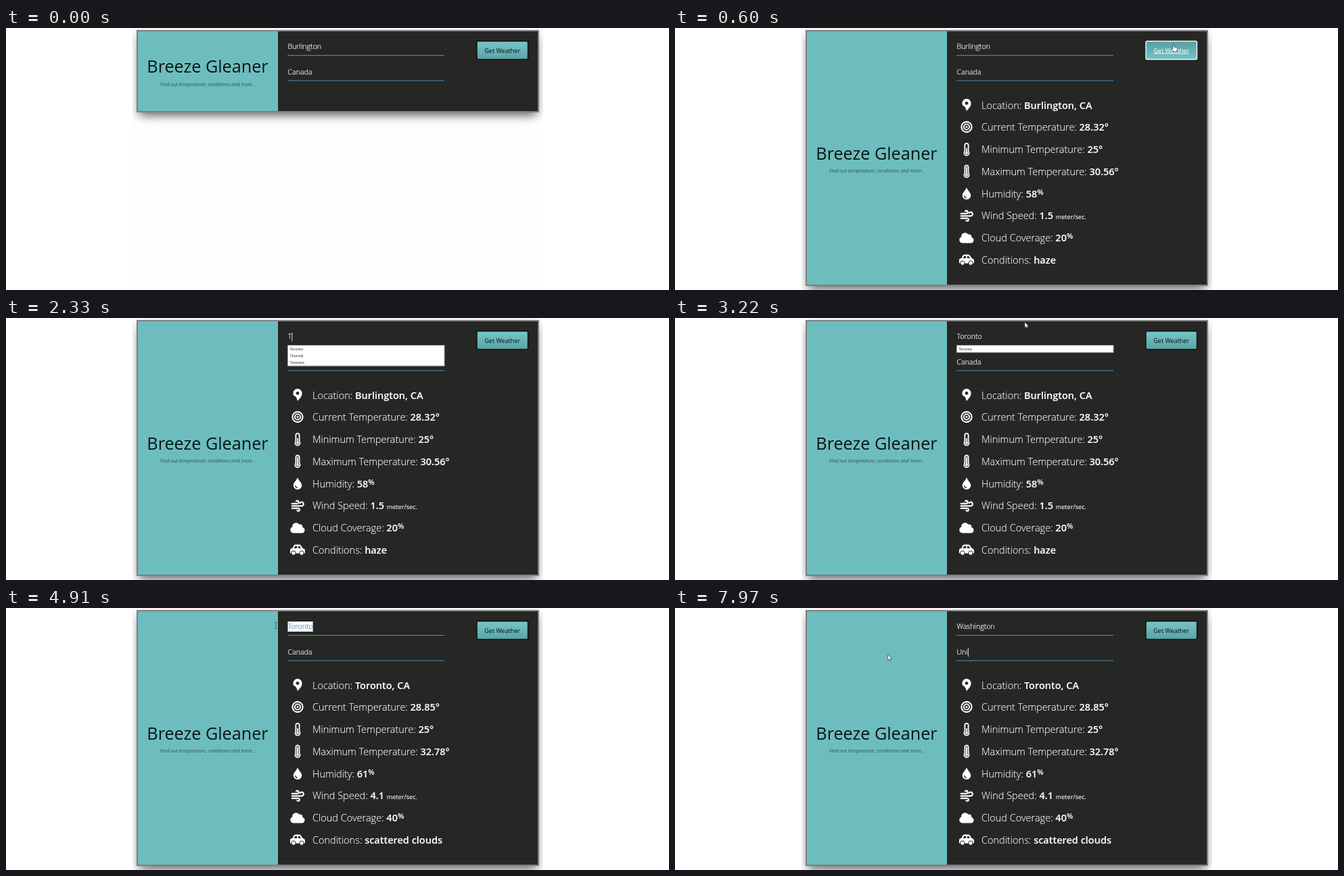
Write an HTML page that moves like this. It is 980 by 388 pixels and loops after 8 s.

```html
<!DOCTYPE html>
<html lang="en">
<head>
<meta charset="utf-8">
<title>Breeze Gleaner</title>
<style>
  html, body { margin: 0; width: 100%; height: 100%; overflow: hidden; background: #fff; }
  #page { position: absolute; left: 187px; top: 0; width: 607px; height: 388px; overflow: hidden; background: #fefefe; }
  #card {
    position: absolute; left: 6px; top: 3px; width: 595px; height: 122px; box-sizing: border-box;
    border: 2px solid #7d807f;
    background: linear-gradient(90deg, #6dbdbf 207px, #262624 207px);
    box-shadow: 0 10px 14px -6px rgba(0, 0, 0, .5), 0 4px 12px rgba(0, 0, 0, .2);
  }
  #card.open { height: 379px; }
  svg { position: absolute; left: 0; top: 0; width: 980px; height: 388px; }
  text { font-family: "Open Sans", sans-serif; white-space: pre; }
  .title { font-size: 25.2px; text-anchor: middle; fill: #0c1414; }
  .tagline { font-size: 7.5px; font-weight: 300; font-style: italic; text-anchor: middle; fill: #0c1a1a; }
  .field { font-size: 10.6px; font-weight: 300; fill: #fff; stroke: #fff; stroke-width: .2; }
  .picked { fill: #3f86b5; stroke: #3f86b5; }
  .row { font-size: 14.5px; font-weight: 300; fill: #fff; stroke: #fff; stroke-width: .12; }
  .value { font-weight: 600; }
  .sup { font-size: 10.8px; font-weight: 600; }
  .unit { font-size: 9.1px; font-weight: 400; }
  .option { font-size: 5.4px; fill: #111; }
  #button rect { fill: url(#idle); stroke: #0b1111; stroke-width: 1.4; }
  #button text { font-size: 9px; text-anchor: middle; fill: #071010; }
  #button.hover rect { fill: url(#hover); stroke: #f2fafa; }
  #button.hover text { fill: #fff; text-decoration: underline; }
  .line { fill: none; stroke: #fff; stroke-linecap: round; }
</style>
</head>
<body>
<div id="page"><div id="card"></div></div>
<svg viewBox="0 0 980 388">
  <defs>
    <linearGradient id="idle" x2="0" y2="1"><stop stop-color="#78c6c8"/><stop offset="1" stop-color="#58a3a5"/></linearGradient>
    <linearGradient id="hover" x2="0" y2="1"><stop stop-color="#559fa1"/><stop offset="1" stop-color="#74c3c5"/></linearGradient>
    <g id="thermometer">
      <path d="M-2.6 3V-6a2.6 2.6 0 0 1 5.2 0V3a3.6 3.6 0 1 1-5.2 0Z" class="line" stroke-width="1.8"/>
      <circle cy="5.4" r="2" fill="#fff"/>
    </g>
  </defs>

  <g id="heading">
    <text class="title" x="298" y="66">Breeze Gleaner</text>
    <text class="tagline" x="298.5" y="85.5">Find out temperature, conditions and more...</text>
  </g>

  <path d="M416 40.5H648M416 78H648" stroke="#4d8fc4"/>
  <g id="fields"></g>
  <g id="list"></g>

  <g id="button">
    <rect x="696" y="19.5" width="75.5" height="27" rx="2"/>
    <text x="733.7" y="36.5">Get Weather</text>
  </g>

  <g id="report">
    <g id="rows"></g>
    <g fill="#fff">
      <path transform="translate(431 114)" fill-rule="evenodd" d="M0 9C-2-1-6.6 3-6.6-2.6a6.6 6.6 0 0 1 13.2 0C6.6 3 2 6 0 9ZM0-5a2.4 2.4 0 1 0 .01 0Z"/>
      <g transform="translate(431 146.5)">
        <circle r="7.6" class="line" stroke-width="2.1"/><circle r="4.1" class="line" stroke-width="1.9"/><circle r="1.6"/>
      </g>
      <g transform="translate(431 179.5)"><use href="#thermometer"/><path d="M0-1V5" class="line" stroke-width="1.6"/></g>
      <g transform="translate(431 212)"><use href="#thermometer"/><path d="M0-5.5V5" class="line" stroke-width="1.8"/></g>
      <path transform="translate(431 245)" fill-rule="evenodd" d="M0-9C1.5-4 6.3-1.5 6.3 3a6.3 6.1 0 0 1-12.6 0C-6.3-1.5-1.5-4 0-9ZM-3.9 3a3.9 3.9 0 0 0 3.9 3.9v-1.3a2.7 2.7 0 0 1-2.7-2.6Z"/>
      <path transform="translate(431 278.3)" class="line" stroke-width="2.2" d="M-8.3-3.5H-.5a2.1 2.1 0 1 0-1.5-3.4M-8.3 0H6a2.8 2.8 0 1 0-2.3-4.3M-8.3 3.5H1a2 2 0 1 1-1.6 3.3"/>
      <path transform="translate(431 311)" d="M-6.5 7.5a4.7 4.7 0 0 1-1.3-9A5.8 5.8 0 0 1 2.7-5.3 3.5 3.5 0 0 1 7.3-1.1 4.4 4.4 0 0 1 6.7 7.5Z"/>
      <g transform="translate(431 343.5)">
        <path fill-rule="evenodd" d="M-7.6-2.5-5.8-6.4Q-5-8-3.3-8H2.5Q4-8 5-6.6L7.7-2.5Q11-2 11 1V4Q11 5 10 5H-10Q-11 5-11 4V0Q-11-2.5-7.6-2.5ZM-5.2-2.5H-.8V-5.7H-3.8ZM.9-2.5H5L3-5.7H.9Z"/>
        <g stroke="#262624"><circle cx="-6" cy="4.6" r="3.2"/><circle cx="6" cy="4.6" r="3.2"/></g>
      </g>
    </g>
  </g>

  <g id="cursor">
    <path id="arrow" d="M0 0V8.4L1.9 6.7 3.2 9.5 4.5 8.9 3.2 6.2H5.9Z" fill="#fff" stroke="#222" stroke-width=".6"/>
    <path id="beam" d="M-2-4.6H-.6L0-4 .6-4.6H2M0-4V4M-2 4.6H-.6L0 4 .6 4.6H2" fill="none" stroke="#4d5556" stroke-width=".9"/>
    <path id="hand" d="M-1 .6Q0-.6 1 .6V4L4.8 5Q5.7 5.3 5.5 6.5L4.6 11H-.4L-3.4 7Q-3.6 5.5-2.2 5.9L-1 7Z" fill="#fff" stroke="#222" stroke-width=".7"/>
  </g>
</svg>
<script>
const LOOP = 8000, TEXT_X = 416.5;
const $ = id => document.getElementById(id);
const show = (node, on) => node.style.display = on ? '' : 'none';

// Pointer moves: start, end, number of steps, way points, progress at which dragging begins
const moves = [
  [70, 450, 6, [[731, 262], [718, 160], [726, 70], [737, 24]]],
  [830, 1600, 11, [[728, 30], [655, 38], [560, 36], [468, 28], [400, 25], [334, 21]], .6],
  [2920, 2920, 1, [[333, 28]]],
  [3220, 3800, 8, [[517, 6], [570, 40], [640, 58], [701, 34]]],
  [4230, 4970, 11, [[690, 42], [620, 50], [530, 42], [457, 30], [415, 27], [383, 25]], .6],
  [5050, 5050, 1, [[381, 24.5]], 0],
  [6060, 6060, 1, [[378, 10.5]]],
  [6550, 7150, 9, [[400, 22], [440, 48], [456, 66], [390, 68], [317, 69]], .5],
  [7810, 7810, 1, [[314.7, 69]]]
];
const hidden = [[0, 70], [2080, 2920], [5400, 6060], [7550, 7810]];

// Typing: word, time of each key, end of the caret
const cityTyping = [
  ['Toronto', [2080, 2400, 2550, 2640, 2735, 2830, 2920], 3080],
  ['Washington', [5400, 5494, 5588, 5682, 5776, 5870, 5964, 6210, 6285, 6360], 6550]
];
const countryTyping = [['United', [7550, 7720, 7970], LOOP]];

const reports = [
  ['Burlington, CA', '28.32°', '25°', '30.56°', '58', '1.5', '20', 'haze'],
  ['Toronto, CA', '28.85°', '25°', '32.78°', '61', '4.1', '40', 'scattered clouds']
];
const labels = ['Location', 'Current Temperature', 'Minimum Temperature', 'Maximum Temperature',
  'Humidity', 'Wind Speed', 'Cloud Coverage', 'Conditions'];
const percent = '<tspan class="sup" dy="-4">%</tspan>';
const suffix = { 4: percent, 5: ' <tspan class="unit">meter/sec.</tspan>', 6: percent };

const rowsHtml = values => labels.map((label, i) =>
  `<text class="row" x="453" y="${119.6 + i * 32.75}">${label}: <tspan class="value">${values[i]}</tspan>${suffix[i] || ''}</text>`
).join('');

function makeField(id, baseline) {
  $('fields').insertAdjacentHTML('beforeend', `
    <clipPath id="${id}Clip"><rect y="${baseline - 11}" height="15"/></clipPath>
    <text class="field" x="${TEXT_X}" y="${baseline}"></text>
    <g clip-path="url(#${id}Clip)">
      <rect x="416" y="${baseline - 11}" width="232" height="15" fill="#fff"/>
      <text class="field picked" x="${TEXT_X}" y="${baseline}"></text>
    </g>
    <rect y="${baseline - 9.5}" width=".9" height="13" fill="#f3e9e4"/>`);
  const clip = $(id + 'Clip').firstChild;
  const plain = $(id + 'Clip').nextElementSibling;
  const picked = plain.nextElementSibling.lastElementChild;
  const caret = $('fields').lastElementChild;
  return (word, from, caretOn) => {
    plain.textContent = picked.textContent = word;
    const end = TEXT_X + plain.getComputedTextLength();
    const left = Math.max(TEXT_X, from);
    clip.setAttribute('x', left);
    clip.setAttribute('width', Math.max(0, end - left));
    caret.setAttribute('x', end + .3);
    show(caret, caretOn);
  };
}
const drawCity = makeField('city', 31);
const drawCountry = makeField('country', 68.5);

function pointerAt(t) {
  const move = moves.filter(m => m[0] <= t).pop() || moves[0];
  const [start, end, steps, points, dragFrom = 2] = move;
  const step = end > start ? Math.min(steps - 1, Math.floor(Math.max(0, t - start) / (end - start) * (steps - 1) + 1e-6)) : 0;
  const progress = steps > 1 ? step / (steps - 1) : 0;
  const place = progress * (points.length - 1);
  const i = Math.min(Math.floor(place), Math.max(0, points.length - 2));
  const a = points[i], b = points[i + 1] || a;
  const mix = axis => a[axis] + (b[axis] - a[axis]) * (place - i);
  return { x: mix(0), y: mix(1), drag: progress >= dragFrom - 1e-6,
    visible: !hidden.some(([from, to]) => t >= from && t < to) };
}

function typedAt(t, initial, typing) {
  const entry = typing.filter(e => e[1][0] <= t).pop();
  if (!entry) return [initial, false];
  const [word, keys, caretEnd] = entry;
  return [word.slice(0, keys.filter(k => k <= t).length), t < caretEnd];
}

function drawList(t) {
  const count = t < 2180 || t >= 3300 ? 0 : t >= 2330 && t < 2400 ? 3 : 1;
  const options = ['Toronto', 'Thorold', 'Timmins'].slice(0, count);
  $('list').innerHTML = count ? `<rect x="416.5" y="40.5" width="231.5" height="${count * 10 + .5}" fill="#fff" stroke="#a5a5a5"/>`
    + options.map((o, i) => `<text class="option" x="419.5" y="${48 + i * 10}">${o}</text>`).join('') : '';
}

function drawPointer({ x, y, visible }, kind) {
  $('cursor').setAttribute('transform', `translate(${x} ${y})`);
  for (const id of ['arrow', 'beam', 'hand']) show($(id), visible && id === kind);
}

let shownReport = -1;
function draw(t) {
  const open = t >= 600;
  $('card').classList.toggle('open', open);
  $('heading').setAttribute('transform', `translate(0 ${open ? 128.7 : 0})`);
  show($('report'), open);
  const report = t < 3950 ? 0 : 1;
  if (report !== shownReport) $('rows').innerHTML = rowsHtml(reports[shownReport = report]);

  const pointer = pointerAt(t), { x, y } = pointer;
  const overButton = pointer.visible && x >= 695 && x <= 773 && y >= 18 && y <= 47;
  const overField = x >= 416 && x <= 648 && (y > 18 && y < 41 || y > 56 && y < 78);
  $('button').classList.toggle('hover', overButton);
  drawPointer(pointer, overButton ? 'hand' : pointer.drag || overField ? 'beam' : 'arrow');

  const from = pointer.drag && pointer.visible ? x : Infinity;
  const [city, cityCaret] = typedAt(t, 'Burlington', cityTyping);
  const [country, countryCaret] = typedAt(t, 'Canada', countryTyping);
  drawCity(city, t < 6000 ? from : Infinity, cityCaret);
  drawCountry(country, t > 6000 ? from : Infinity, countryCaret);
  drawList(t);
}

const started = performance.now();
(function tick() {
  draw((performance.now() - started) % LOOP);
  requestAnimationFrame(tick);
})();
</script>
</body>
</html>
```
